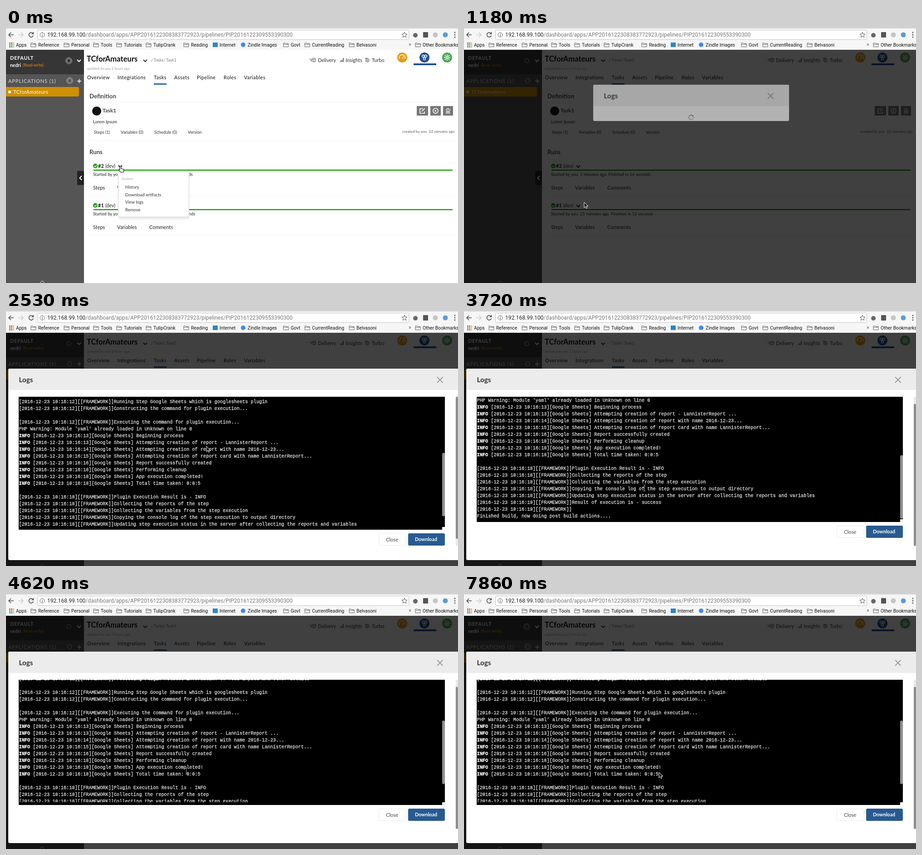
Write an HTML page that moves like this. It is 997 by 562 pixels and loops after 8 s.

```html
<!DOCTYPE html>
<html lang="en">
<head>
<meta charset="utf-8">
<title>Task logs</title>
<style>
  html, body { margin: 0; width: 100%; height: 100%; overflow: hidden; background: #fff; }
  svg { display: block; width: 997px; height: 562px; }
  text { font-family: Lato, sans-serif; white-space: pre; }
  .ui { font-family: Roboto, sans-serif; }
  .mono { font-family: "Liberation Mono", monospace; font-size: 10.27px; fill: #e2e2e2; stroke: #e2e2e2; stroke-width: .3px; }
  .mono tspan { font-weight: bold; fill: #fff; }
</style>
</head>
<body>
<svg id="stage" viewBox="0 0 997 562"></svg>
<script>
const LOOP = 8000;

// Markup helpers; text is placed by its left edge and the middle of its capitals.
const text = (x, cy, str, size, fill = '#222', extra = '') =>
  `<text x="${x}" y="${cy + size * .36}" font-size="${size}" fill="${fill}" ${extra}>${str}</text>`;
const bold = (x, cy, str, size, fill, extra = '') =>
  text(x, cy, str, size, fill, `font-weight="700" ${extra}`);
const rect = (x, y, w, h, fill, extra = '') =>
  `<rect x="${x}" y="${y}" width="${w}" height="${h}" fill="${fill}" ${extra}/>`;
const circle = (x, y, r, fill, extra = '') =>
  `<circle cx="${x}" cy="${y}" r="${r}" fill="${fill}" ${extra}/>`;
const line = (d, color, width = 1, extra = '') =>
  `<path d="${d}" fill="none" stroke="${color}" stroke-width="${width}" ${extra}/>`;
const shape = (d, fill, extra = '') => `<path d="${d}" fill="${fill}" ${extra}/>`;
const chevron = (x, y, color, s = 4) => line(`M${x - s} ${y - s / 2}l${s} ${s}l${s} ${-s}`, color, 2);
const spokes = (x, y, n, r1, r2, draw) => Array.from({ length: n }, (_, i) => {
  const a = i * 2 * Math.PI / n, c = Math.cos(a), s = Math.sin(a);
  return draw(x + c * r1, y + s * r1, x + c * r2, y + s * r2, i);
}).join('');

function browserBar() {
  const folder = x => line(`M${x} 33h4l1.5 1.5h5.5v7h-11zM${x} 36h11`, '#666', 1);
  const folders = [[55, 'Reference'], [128, 'Personal'], [193, 'Tools'], [244, 'Tutorials'],
    [309, 'TulipCrank'], [392, 'Reading'], [612, 'Govt'], [659, 'CurrentReading'],
    [757, 'Belvasoni'], [903, 'Other Bookmarks']];
  const label = (x, str) => text(x, 37, str, 10.3, '#111', 'class="ui"');
  const gridColors = ['#e04a3a', '#e04a3a', '#f2b01e', '#3b9c55', '#4b83e0', '#f2b01e', '#3b9c55', '#4b83e0', '#f2b01e'];
  return rect(0, 0, 997, 48, '#f6f6f6') + rect(0, 0, 997, 1, '#cfcfcf')
    + rect(69.5, 4.5, 819, 21, '#fff', 'rx="2" stroke="#c4c4c4"')
    + line('M17 15H6M11 10l-5 5l5 5', '#555', 1.7)
    + line('M27 15h11M33 10l5 5l-5 5', '#ccc', 1.7)
    + line('M59.5 12a5 5 0 1 0 .7 4.5M60.5 9v4h-4', '#555', 1.7)
    + circle(80, 15, 5, 'none', 'stroke="#666"') + line('M80 14v4M80 11.7v1.3', '#666', 1.3)
    + text(91, 15, '192.168.99.100<tspan fill="#777">/dashboard/apps/APP2016122308383772923/pipelines/PIP2016122309553390300</tspan>', 12.1, '#222', 'class="ui"')
    + shape('M879 9l1.7 4l4.3.4l-3.3 2.8l1 4.3l-3.7-2.3l-3.7 2.3l1-4.3l-3.3-2.8l4.3-.4z', 'none', 'stroke="#555"')
    + circle(903, 16, 5, '#666') + rect(920, 9, 11, 12, '#555', 'rx="1"') + circle(947, 15, 5.5, '#c5c5c5') + circle(969, 15, 5.5, '#5b9bd5')
    + [10, 15, 20].map(y => circle(990, y, 1.4, '#555')).join('')
    + gridColors.map((c, i) => rect(7 + i % 3 * 4, 32 + Math.floor(i / 3) * 4, 2.8, 2.8, c)).join('')
    + label(22, 'Apps') + folders.map(([x, s]) => folder(x) + label(x + 16, s)).join('')
    + rect(456, 32, 11, 10, '#2c86c8') + label(471, 'Internet')
    + circle(523, 37, 5, '#4285f4') + label(533, 'Zindle Images') + text(888, 36, '»', 12, '#555', 'class="ui"');
}

function sidebar() {
  const ring = (x, y) => circle(x, y, 4.5, 'none', 'stroke="#ccc" stroke-width="1.2"')
    + circle(x, y, 7, 'none', 'class="halo" stroke="#aaa"');
  return rect(0, 48, 172, 514, '#555') + rect(0, 48, 172, 54, '#363636')
    + bold(9, 66, 'DEFAULT', 11, '#fff', 'letter-spacing=".7"')
    + bold(9, 82, 'nedri', 10.4, '#fff') + text(37, 82, '(Read-write)', 8.6, '#ee8a10')
    + ring(138.5, 72) + chevron(161, 72, '#fff')
    + text(5, 117, 'APPLICATIONS (1)', 11, '#ddd', 'letter-spacing=".9"')
    + ring(140.5, 116) + line('M157 117h9M161.5 112.500v9', '#ddd', 2)
    + shape('M0 130h158a3 3 0 0 1 3 3v15a3 3 0 0 1-3 3H0z', '#cf8f00')
    + circle(8, 141, 3.3, '#fff') + text(16, 141, 'TCforAmateurs', 11, '#fff', 'letter-spacing=".3"')
    + circle(80, 562, 4, 'none', 'stroke="#bbb" stroke-width="1.3"')
    + rect(157, 315, 15, 31, '#222') + line('M167 326l-4.500 4.500l4.500 4.500', '#fff', 2);
}

function pageHeader() {
  const tabs = [[179, 'Overview'], [246, 'Integrations'], [326, 'Tasks'], [371, 'Assets'],
    [421, 'Pipeline'], [480, 'Roles'], [525, 'Variables']];
  return bold(178, 68, 'TCforAmateurs', 16.6, '#111') + chevron(307, 72, '#333')
    + text(320, 71, '/ Tasks/ Task1', 9, '#777') + text(178, 89, 'updated by you 2 hours ago', 7.8, '#999')
    + tabs.map(([x, s]) => text(x, 109, s, 11, '#111', 'letter-spacing=".4"')).join('')
    + rect(326, 122, 28, 3, '#2b66ad')
    + line('M669 69h5M671 72h4M675 68l4-2l4 2v5l-4 2l-4-2zM675 68l4 2l4-2M679 70v5', '#555')
    + text(688, 71, 'Delivery', 10.9, '#333')
    + line('M738 75v-3M741 75v-5M744 75v-9', '#555', 1.7) + text(749, 71, 'Insights', 10.9, '#333')
    + circle(797, 71, 4, 'none', 'stroke="#555"') + circle(797, 71, 1.7, 'none', 'stroke="#555"') + line('M791 66.500h6', '#555')
    + text(807, 71, 'Turbo', 10.9, '#333')
    + circle(874, 65, 11, '#ea990f') + line('M868 68a6.500 6.500 0 1 1 12 0M874 68l3-5', '#fff', 1.5)
    + circle(923, 65, 11, '#1f4f90') + [[920, 62], [926, 62], [923, 68]].map(([x, y]) => circle(x, y, 2.5, 'none', 'stroke="#fff" stroke-width="1.3"')).join('')
    + rect(899, 78, 50, 4, '#20509c')
    + circle(973, 65, 11, '#4ea858') + spokes(973, 65, 8, 1, 6, (a, b, c, d) => line(`M${a} ${b}L${c} ${d}`, '#fff', 1.2) + circle(c, d, 1, '#fff'));
}

function run(y, number, age) {
  return circle(197, y, 5, '#1ea10a') + line(`M194.500 ${y}l2 2l3.500-3.500`, '#fff', 1.4)
    + bold(203, y, '#' + number, 11, '#111') + text(219, y, '(dev)', 10.6, '#222') + chevron(252, y + 1, '#111')
    + rect(193, y + 8, 792, 2.5, '#1ea10a')
    + text(192, y + 19, `Started by you  ${age} minutes ago. Finished in 16 seconds`, 9.4)
    + [[192, 'Steps'], [245, 'Variables'], [316, 'Comments']].map(([x, s]) => text(x, y + 48, s, 11)).join('')
    + line(`M183 ${y + 66.5}h812`, '#f1f1f1');
}

function taskPage() {
  const stats = [[194, 'Steps (1)'], [253, 'Variables (0)'], [327, 'Schedule (0)'], [401, 'Version']];
  return bold(184, 150, 'Definition', 13.2, '#484848') + line('M183 163.500h812M183.500 163.500v84M183 247.500h812', '#f4f4f4')
    + circle(200, 183, 10, '#111') + bold(213, 182, 'Task1', 11.8, '#444') + text(192, 207, 'Lorem Ipsum', 9.4)
    + stats.map(([x, s]) => text(x, 230, s, 9.4, '#333')).join('')
    + text(874, 228, 'created by you  22 minutes ago', 8.45, '#555')
    + rect(906, 172, 25, 21, '#777') + rect(936, 172, 23, 21, '#777') + rect(964, 172, 22, 21, '#777')
    + line('M920 178h-7v10h10v-4M917 184l7-7', '#fff', 1.7)
    + circle(947.5, 182.5, 5.5, 'none', 'stroke="#fff" stroke-width="1.6"') + shape('M946 180l4 2.500l-4 2.500z', '#fff')
    + line('M970 179h10M973 177.500h4M971.500 180v8h7v-8M974 182v5M976 182v5', '#fff', 1.2)
    + bold(184, 273, 'Runs', 13.2, '#484848') + run(304, 2, 2) + run(391, 1, 21);
}

function contextMenu() {
  const items = ['History', 'Download artifacts', 'View logs', 'Remove'];
  return rect(249, 319, 155, 103, '#000', 'opacity=".07" rx="3"') + rect(247.5, 316.5, 156, 100, '#fff', 'stroke="#ccc" rx="2"')
    + '<rect id="hover" x="256" width="140" height="16" fill="#f3f3f3"/>'
    + text(255, 332, 'System', 8, '#aaa') + items.map((s, i) => text(263, 351 + i * 16.5, s, 9.5, '#333')).join('');
}

const modalFrame = (x, y, w, h) => rect(x, y, w, h, '#fff', 'rx="3"') + rect(x, y, w, 47, '#ececec', 'rx="3"')
  + bold(x + 23.5, y + 24.5, 'Logs', 15.2, '#333')
  + line(`M${x + w - 47} ${y + 18.5}l12.500 12.500m0-12.500l-12.500 12.500`, '#999', 1.8);

const loadingModal = modalFrame(285, 125, 432, 80)
  + spokes(501, 197, 8, 5, 5, (x, y, _x, _y, i) => circle(x, y, 1.3, '#333', `opacity="${.3 + i * .09}"`));

// F = framework line, I = info line, each followed by its seconds.
const LOG = `F04 Started by nedri@tulipcrank.com
F04 Collecting Parameters of the build...
F04 Collecting parameters of the build is completed
F05 Initializing the tulipcrank configuration setup details
F06 Collecting build details like start time, status, reports location etc.
F06 Collecting build details completed
F10 Initializing App Framework started...
F10 Initializing plugins used for this pipeline..
F11 Loading Plugin : googlesheets
F11 Initializing App Framework completed.
F11 Collecting Job Variables...
F11 Collected Job Variables...

F11 Checking dependency conditions before executing the step
F11 Dependency conditions met for this step : true
F11 Processing Plugin related information to read inputs and other details

F12 Running Step Google Sheets which is googlesheets plugin
F12 Constructing the command for plugin execution...

F12 Executing the command for plugin execution...
PHP Warning: Module 'yaml' already loaded in Unknown on line 0
I13 Beginning process
I13 Attempting creation of report - LannisterReport ...
I14 Attempting creation of report with name 2016-12-23...
I15 Attempting creation of report card with name LannisterReport...
I16 Report successfully created
I18 Performing cleanup
I18 App execution completed!
I18 Total time taken: 0:0:5

F18 Plugin Execution Result is - INFO
F18 Collecting the reports of the step
F18 Collecting the variables from the step execution
F18 Copying the console log of the step execution to output directory
F18 Updating step execution status in the server after collecting the reports and variables
F19 Result of execution is - success
F19 
Finished build, now doing post build actions....`;

const logLine = (str, i) => {
  const content = str
    .replace(/^F(\d\d) /, '[2016-12-23 10:16:$1][[FRAMEWORK]]')
    .replace(/^I(\d\d) /, '<tspan>INFO</tspan> [2016-12-23 10:16:$1][Google Sheets] ');
  return `<text class="mono" x="28.5" y="${200.3 + i * 15}">${content}</text>`;
};

const logModal = modalFrame(5, 127, 993, 422)
  + rect(992, 189, 5, 328, '#e9e9e9') + '<rect id="outerThumb" x="992" width="5" height="313" rx="2" fill="#8e8e8e"/>'
  + `<g clip-path="url(#bodyClip)"><g id="body">`
  + rect(28, 189, 940, 287, '#000') + rect(28, 476, 934, 6, '#000')
  + `<g clip-path="url(#logClip)"><g id="log">${LOG.split('\n').map(logLine).join('')}</g></g>`
  + '<rect id="innerThumb" x="962" width="6" height="140" rx="3" fill="#8e8e8e"/>'
  + rect(822.5, 490.5, 60, 26, '#fff', 'rx="3" stroke="#e8e8e8"') + text(838, 504, 'Close', 11.2, '#444')
  + rect(887, 490, 81, 27, '#285a90', 'rx="3"') + bold(902, 503.5, 'Download', 10.7, '#fff')
  + '</g></g>';

const cursors = {
  arrow: shape('M0 0v12l2.800-2.600l2 4.200l2-.9l-1.900-4.100h3.700z', '#111', 'stroke="#fff"'),
  hand: shape('M-2 1q0-2 1.500-2t1.500 2v4l5 1q1.500.5 1 3l-1 4h-6l-4-5q0-2 2-1z', '#fff', 'stroke="#111" stroke-width="1.200"'),
  beam: line('M-2.500-7q2.500 0 2.500 2v10q0 2-2.500 2M2.500-7q-2.500 0-2.500 2M0 5q0 2 2.500 2M-1.500 2.500h3', '#8a8a8a', 1.1)
};

const group = (id, content) => `<g id="${id}">${content}</g>`;
const stage = document.getElementById('stage');
stage.innerHTML = `<clipPath id="bodyClip">${rect(28, 189, 969, 328, '#000')}</clipPath>
  <clipPath id="logClip">${rect(28, 189, 940, 287, '#000')}</clipPath>`
  + rect(0, 0, 997, 562, '#fff') + sidebar() + pageHeader() + taskPage() + group('menu', contextMenu())
  + group('shade', rect(0, 48, 997, 514, '#000')) + group('loading', loadingModal) + group('logs', logModal)
  + browserBar() + Object.entries(cursors).map(([id, s]) => group(id, s)).join('');

// Step tables: [start time, ...values], each held until the next row.
const POINTER = [[0, 253, 305, 'hand'], [140, 255, 318, 'hand'], [290, 258, 335, 'hand'], [430, 262, 354, 'hand'],
  [580, 264, 372, 'hand'], [730, 265, 384, 'hand'], [1030, 265, 384, 'arrow'], [1490, 300, 330, 'arrow'],
  [1640, 341, 265, 'arrow'], [1790, 442, 298, 'arrow'], [3130, 416, 335, 'arrow'], [3280, 392, 379, 'beam'],
  [3570, 395, 386, 'beam'], [3720, 398, 390, 'beam'], [5670, 385, 362, 'beam'], [5960, 315, 306, 'beam'],
  [6250, 262, 296, 'beam'], [6400, 212, 294, 'beam'], [6540, 176, 302, 'beam'], [6690, 190, 314, 'beam'],
  [6840, 224, 328, 'beam'], [6990, 268, 343, 'beam'], [7130, 309, 356, 'beam'], [7280, 335, 364, 'beam'],
  [7420, 362, 374, 'beam'], [7570, 394, 384, 'beam'], [7720, 418, 390, 'arrow'], [7860, 430, 393, 'arrow']];
const SCROLL = [[0, 0, 0], [2230, 60, 0], [2380, 160, 0], [2530, 252, 0], [2680, 298, 17],
  [4170, 283, 17], [4320, 255, 17], [4470, 230, 17], [4620, 218, 17]];
const SHADE = [[0, 0], [1030, .38], [1180, .75]];
const LOADING = [[0, 0], [1180, .6], [1340, 1], [1640, 0]];

const at = (table, t) => table.findLast(row => row[0] <= t).slice(1);
const el = id => document.getElementById(id);
const set = (id, name, value) => el(id).setAttribute(name, value);
const show = (id, on) => set(id, 'visibility', on ? 'visible' : 'hidden');
const halos = document.querySelectorAll('.halo');

function render(t) {
  const [x, y, kind] = at(POINTER, t);
  const [inner, outer] = at(SCROLL, t);
  for (const id in cursors) show(id, id === kind);
  set(kind, 'transform', `translate(${x} ${y})`);

  const row = Math.round((y - 351) / 16.5);
  show('menu', t < 1030);
  show('hover', t < 1030 && row >= 0);
  set('hover', 'y', 343 + row * 16.5);
  halos.forEach(h => h.setAttribute('visibility', t < 290 || t >= 5670 ? 'visible' : 'hidden'));

  set('shade', 'opacity', at(SHADE, t)[0]);
  set('loading', 'opacity', at(LOADING, t)[0]);
  show('logs', t >= 1640);
  set('body', 'transform', `translate(0 ${-outer})`);
  set('log', 'transform', `translate(0 ${-inner})`);
  set('innerThumb', 'y', 190.5 + inner * .484);
  set('outerThumb', 'y', 189 + outer * .92);
}

const start = performance.now();
function tick() {
  render((performance.now() - start) % LOOP);
  requestAnimationFrame(tick);
}
tick();
</script>
</body>
</html>
```
